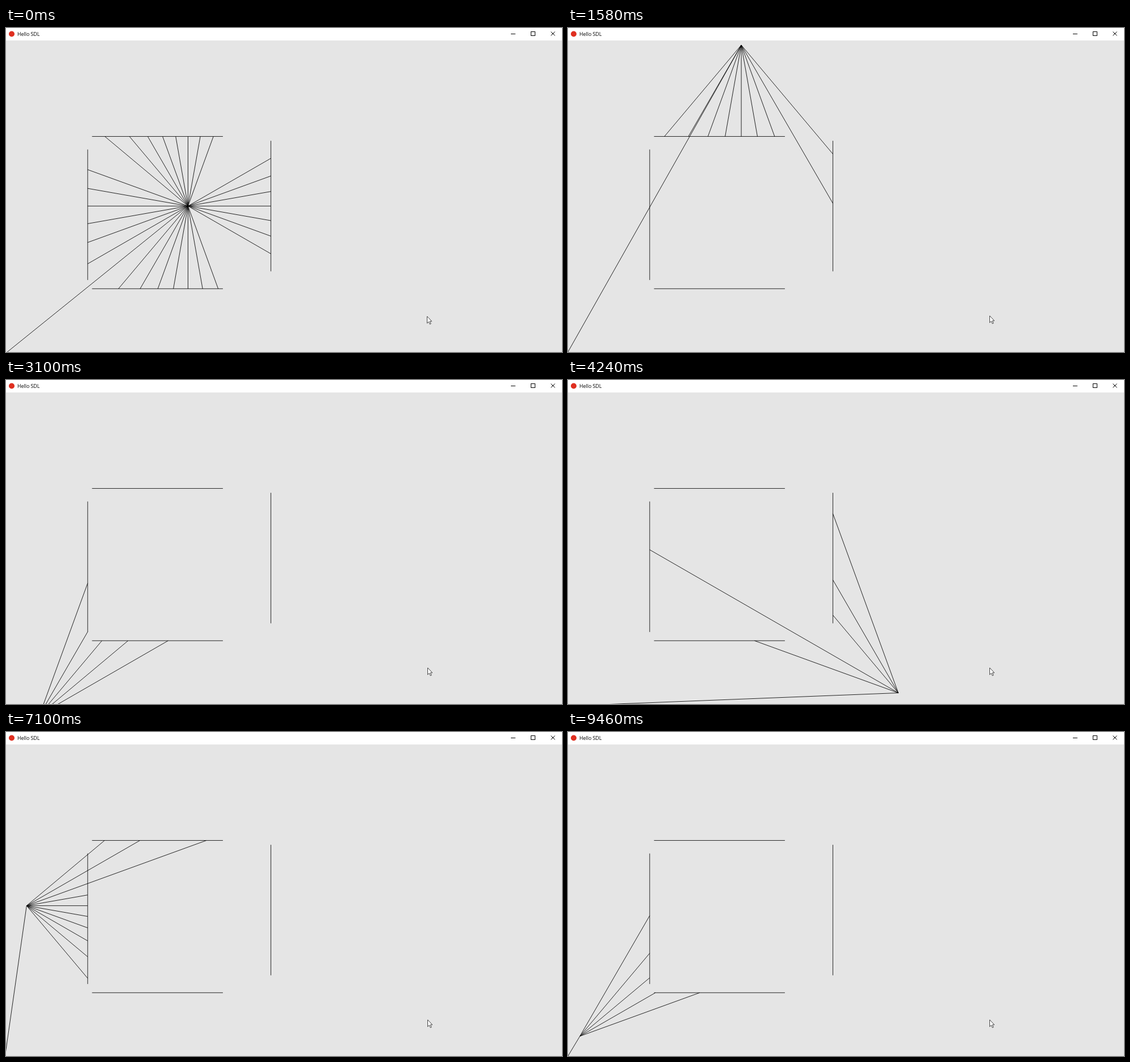
Animation of 979 by 572 pixels, one loop 9560 ms. Source, as an HTML page:

```html
<!DOCTYPE html>
<html lang="en">
<head>
<meta charset="utf-8">
<title>Hello SDL</title>
<style>
  html, body { margin: 0; width: 100%; height: 100%; overflow: hidden; background: #e5e5e5; }
  svg { display: block; }
  text { font: 8.8px "Open Sans", "Noto Sans", sans-serif; }
  path { fill: none; stroke: #000; }
  .scene { stroke-width: .85; }
  .crisp { shape-rendering: crispEdges; }
  #cursor { fill: #fff; stroke: #333; stroke-width: .9; }
</style>
</head>
<body>
<svg width="979" height="572" viewBox="0 0 979 572">
  <rect width="979" height="572" fill="#e5e5e5"/>
  <path id="walls" class="scene"/>
  <path id="rays" class="scene"/>
  <rect width="979" height="22" fill="#fff"/>
  <circle cx="10" cy="10.5" r="5" fill="#df2f20"/>
  <text x="20" y="13.6">Hello SDL</text>
  <path class="crisp" d="M889 10.5h8M924.5 6.5h7v7h-7z"/>
  <path d="M959.5 6.5l7 7m0-7l-7 7"/>
  <path id="cursor" d="M.5 .5v12.2l2.8-2.6 2 4.4 1.9-.9-2-4.2h3.6z"/>
</svg>
<script>
const LOOP = 9560, TICK = 20;          // ms
const SPEED = 0.6, STEP = 10;          // world units per ms, grid of the lamp
const HEIGHT = 720, WALL = 300, RAYS = 36;

const home = { x: 420, y: 380 };

// Arrow keys held down: direction, start in ms, distance
const keys = [
  ["right", 30, 220], ["up", 580, 370], ["left", 1180, 560], ["down", 1880, 730],
  ["right", 3107, 740], ["up", 4157, 80], ["up", 4510, 170], ["down", 5050, 300],
  ["left", 5483, 770], ["up", 6400, 680], ["right", 7533, 270], ["left", 8170, 290],
  ["down", 8527, 560]
];
const heading = { left: [-1, 0], right: [1, 0], up: [0, -1], down: [0, 1] };

// Checked in this order: bottom, left, top, right
const walls = [
  { x: 200, y: 570 },
  { x: 190, y: 250, upright: true },
  { x: 200, y: 220 },
  { x: 610, y: 230, upright: true }
];

const el = id => document.getElementById(id);
const clamp = (v, max) => Math.min(Math.max(v, 0), max);
const snap = v => Math.round(v / STEP) * STEP;
const point = ([x, y]) => `${(x * 0.768 - 2.1).toFixed(2)} ${(y * 0.768 + 22.5).toFixed(2)}`;
const segment = (a, b) => `M${point(a)}L${point(b)}`;

function lampAt(t) {
  let { x, y } = home;
  for (const [key, at, distance] of keys) {
    const moved = clamp((t - at) * SPEED, distance);
    x += heading[key][0] * moved;
    y += heading[key][1] * moved;
  }
  return [snap(x), snap(y)];
}

function hit(wall, [x, y], dx, dy) {
  const dist = wall.upright ? (wall.x - x) / dx : (wall.y - y) / dy;
  const p = wall.upright ? [wall.x, y + dist * dy] : [x + dist * dx, wall.y];
  const along = wall.upright ? p[1] - wall.y : p[0] - wall.x;
  return dist > 0 && along >= 0 && along <= WALL ? { p, dist } : null;
}

// A later wall wins when its distance is below the length of the kept point;
// rays that meet nothing end at the bottom-left corner of the world.
function cast(lamp, angle) {
  const dx = Math.cos(angle), dy = Math.sin(angle);
  let end = null;
  for (const wall of walls) {
    const h = hit(wall, lamp, dx, dy);
    if (h && (!end || h.dist < Math.hypot(end[0], HEIGHT - end[1]))) end = h.p;
  }
  return end || [0, HEIGHT];
}

function draw(time) {
  const t = time - time % TICK;
  const lamp = lampAt(t);
  const lines = new Set();
  for (let i = 0; i < RAYS; i++) {
    lines.add(segment(lamp, cast(lamp, i * 2 * Math.PI / RAYS)));
  }
  el("rays").setAttribute("d", [...lines].join(""));
  const nudge = t < 60 ? 0 : 1;
  el("cursor").setAttribute("transform", `translate(${741 + nudge} ${508.5 - nudge})`);
}

el("walls").setAttribute("d", walls.map(({ x, y, upright }) =>
  segment([x, y], upright ? [x, y + WALL] : [x + WALL, y])).join(""));

const start = performance.now();
function tick() {
  draw((performance.now() - start) % LOOP);
  requestAnimationFrame(tick);
}
tick();
</script>
</body>
</html>
```
